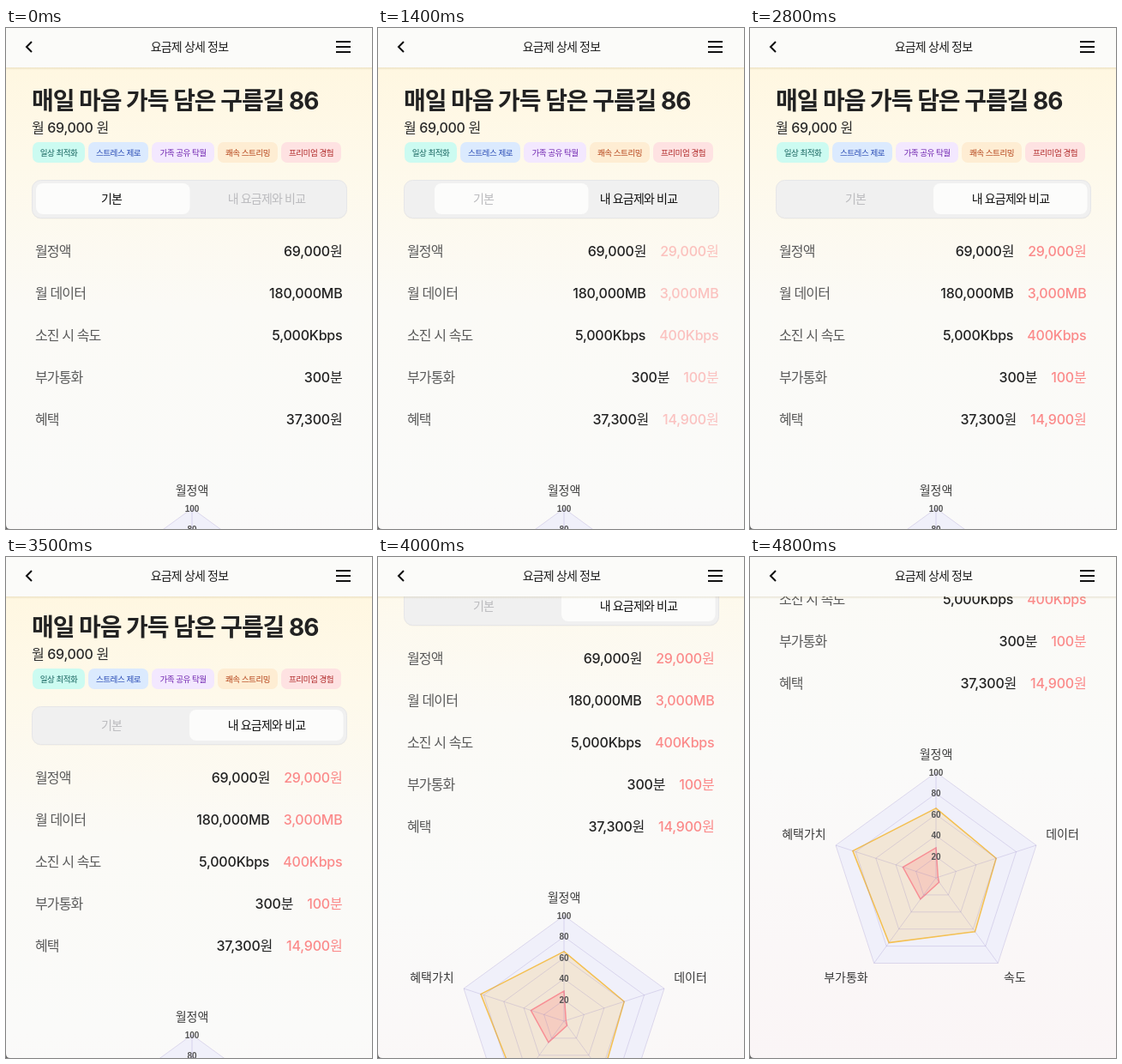
Write an HTML page that moves like this. It is 427 by 584 pixels and loops after 6.5 s.

```html
<!DOCTYPE html>
<html lang="ko">
<head>
<meta charset="utf-8">
<style>
  html, body { margin: 0; width: 100%; height: 100%; overflow: hidden; background: #fafaf9; }
  svg { display: block; font-family: Inter, "Noto Sans CJK KR", "Noto Sans CJK", sans-serif; }
  .ko { letter-spacing: -.055em; }
  .num { letter-spacing: -.012em; font-weight: 500; }
  .mid { text-anchor: middle; }
  .end { text-anchor: end; }
  .tick { font: bold 10px "Liberation Sans", Arial, sans-serif; fill: #555; }
</style>
</head>
<body>
<svg width="427" height="584" viewBox="0 0 427 584">
  <defs>
    <linearGradient id="page" x1="0" y1="0" x2="0" y2="1">
      <stop offset="0" stop-color="#fff7e1"/>
      <stop offset=".13" stop-color="#fef9ea"/>
      <stop offset=".33" stop-color="#fbfaf6"/>
      <stop offset=".6" stop-color="#fafaf9"/>
      <stop offset="1" stop-color="#faf5f6"/>
    </linearGradient>
    <linearGradient id="shade" x1="0" y1="0" x2="0" y2="1">
      <stop offset="0" stop-color="#a08c50" stop-opacity=".2"/>
      <stop offset="1" stop-color="#a08c50" stop-opacity="0"/>
    </linearGradient>
  </defs>
  <g id="content">
    <rect y="46" width="427" height="850" fill="url(#page)"/>
    <text x="30" y="95" font-size="28" font-weight="700" fill="#222" letter-spacing="-.037em">매일 마음 가득 담은 구름길 86</text>
    <text x="30" y="122" font-size="16" font-weight="500" fill="#2b2b2b" letter-spacing="-.02em">월 69,000 원</text>
    <g id="tags"></g>
    <rect x="30.5" y="178.5" width="367" height="44" rx="10" fill="#000" opacity=".05"/>
    <rect x="30.5" y="177.5" width="367" height="44" rx="10" fill="#f0f0f0" stroke="#e6e6e8"/>
    <rect id="slider" x="35" y="181" width="179.500" height="36" rx="8" fill="#fcfcfb"/>
    <g class="ko mid" font-size="14" font-weight="500">
      <text id="basicTab" x="123" y="204">기본</text>
      <text id="compareTab" x="304" y="204">내 요금제와 비교</text>
    </g>
    <g id="rows" font-size="16"></g>
    <g id="radar"></g>
  </g>
  <rect y="46" width="427" height="3" fill="url(#shade)"/>
  <rect width="427" height="46" fill="#fbfbf9"/>
  <path d="M30 16L24 22L30 28M385 16H402M385 22H402M385 28H402" fill="none" stroke="#111" stroke-width="2"/>
  <text class="ko mid" x="214" y="27" font-size="14" font-weight="500" fill="#1c1c1c">요금제 상세 정보</text>
  <path d="M0 579Q0 584 5 584H0Z" fill="#666"/>
</svg>
<script>
const $ = id => document.getElementById(id);
const INACTIVE = '#bbbbbe', HOVER = '#8b8b90', ACTIVE = '#111';

const tags = [
  ['일상 최적화', 31, 61, '#ccfbf1', '#17645f'],
  ['스트레스 제로', 96, 70, '#dbeafe', '#2a4cb5'],
  ['가족 공유 탁월', 170, 73, '#f3e8ff', '#7126b0'],
  ['쾌속 스트리밍', 247, 70, '#feedd3', '#b5441a'],
  ['프리미엄 경험', 321, 70, '#fee2e2', '#b02a2a'],
];
$('tags').innerHTML = tags.map(([label, x, w, bg, fg]) =>
  `<rect x="${x}" y="133" width="${w}" height="24" rx="7" fill="${bg}"/>
   <text class="ko mid" x="${x + w / 2}" y="148.500" font-size="9.600" fill="${fg}">${label}</text>`).join('');

const rows = [
  ['월정액', '69,000원', '29,000원'],
  ['월 데이터', '180,000MB', '3,000MB'],
  ['소진 시 속도', '5,000Kbps', '400Kbps'],
  ['부가통화', '300분', '100분'],
  ['혜택', '37,300원', '14,900원'],
];
$('rows').innerHTML = rows.map(([label, plan, mine], i) => {
  const y = 266 + 49 * i;
  return `<text class="ko" x="34" y="${y}" fill="#5a5a5a">${label}</text>
    <text class="num end value" x="392.500" y="${y}" fill="#222">${plan}<tspan class="mine" dx="16" fill="#fb8a8a">${mine}</tspan></text>`;
}).join('');

// Radar chart: values run clockwise from the top, 0 to 100
const CX = 217, CY = 683, R = 123;
const spoke = (value, i) => {
  const a = i * Math.PI * 2 / 5, r = R * value / 100;
  return `${(CX + r * Math.sin(a)).toFixed(1)},${(CY - r * Math.cos(a)).toFixed(1)}`;
};
const polygon = (values, attrs) => `<polygon points="${values.map(spoke).join(' ')}" ${attrs}/>`;
const ring = v => Array(5).fill(v);
const levels = [20, 40, 60, 80, 100];
const axes = [['월정액', 217, 544], ['데이터', 364.5, 637], ['속도', 309, 804], ['부가통화', 112, 804], ['혜택가치', 63, 637]];
$('radar').innerHTML =
  polygon(ring(100), 'fill="#f0f0fa"') +
  polygon([66, 60, 63, 76, 83], 'fill="#f5c060" fill-opacity=".23" stroke="#f4c052" stroke-width="1.500"') +
  polygon([28.5, 2, 5, 25, 33], 'fill="#f98a8a" fill-opacity=".27" stroke="#f88f95" stroke-width="1.500"') +
  `<g fill="none" stroke="#8c78be" stroke-opacity=".24">` +
  levels.map(v => polygon(ring(v), '')).join('') +
  ring(100).map((v, i) => `<path d="M${CX},${CY}L${spoke(v, i)}"/>`).join('') + '</g>' +
  levels.map(v => `<text class="tick mid" x="${CX}" y="${CY - R * v / 100 + 3.5}">${v}</text>`).join('') +
  axes.map(([label, x, y]) => `<text class="mid" x="${x}" y="${y}" font-size="14" fill="#3a3a3a">${label}</text>`).join('');

const values = document.querySelectorAll('.value');
const mines = document.querySelectorAll('.mine');

// Piecewise linear track through [time, value] points
function track(t, points) {
  let [t0, v0] = points[0];
  if (t <= t0) return v0;
  for (const [t1, v1] of points) {
    if (t < t1) return v0 + (v1 - v0) * (t - t0) / (t1 - t0);
    [t0, v0] = [t1, v1];
  }
  return v0;
}

function render(now) {
  const t = Math.floor(now % 6500 / 100) * 100;
  const compare = t >= 1400;
  const slide = track(t, [[1300, 0], [1400, .173], [1500, .8], [1600, 1]]);
  const fade = track(t, [[1300, 0], [1400, .5], [1500, .87], [1600, 1]]);
  const scroll = track(t, [[3400, 0], [3500, 3], [4000, 142], [4400, 249], [4600, 291], [4700, 303], [4800, 309]]);

  $('content').setAttribute('transform', `translate(0 ${-Math.round(scroll)})`);
  $('slider').setAttribute('x', 35 + 179 * slide);
  $('basicTab').setAttribute('fill', compare ? INACTIVE : ACTIVE);
  $('compareTab').setAttribute('fill', compare ? ACTIVE : t >= 800 ? HOVER : INACTIVE);
  values.forEach(el => el.setAttribute('x', 392.5 + (compare ? 10 * (1 - fade) : 0)));
  mines.forEach(el => {
    el.style.display = compare ? '' : 'none';
    el.setAttribute('fill-opacity', fade);
  });
  requestAnimationFrame(() => render(performance.now()));
}
render(0);
</script>
</body>
</html>
```
